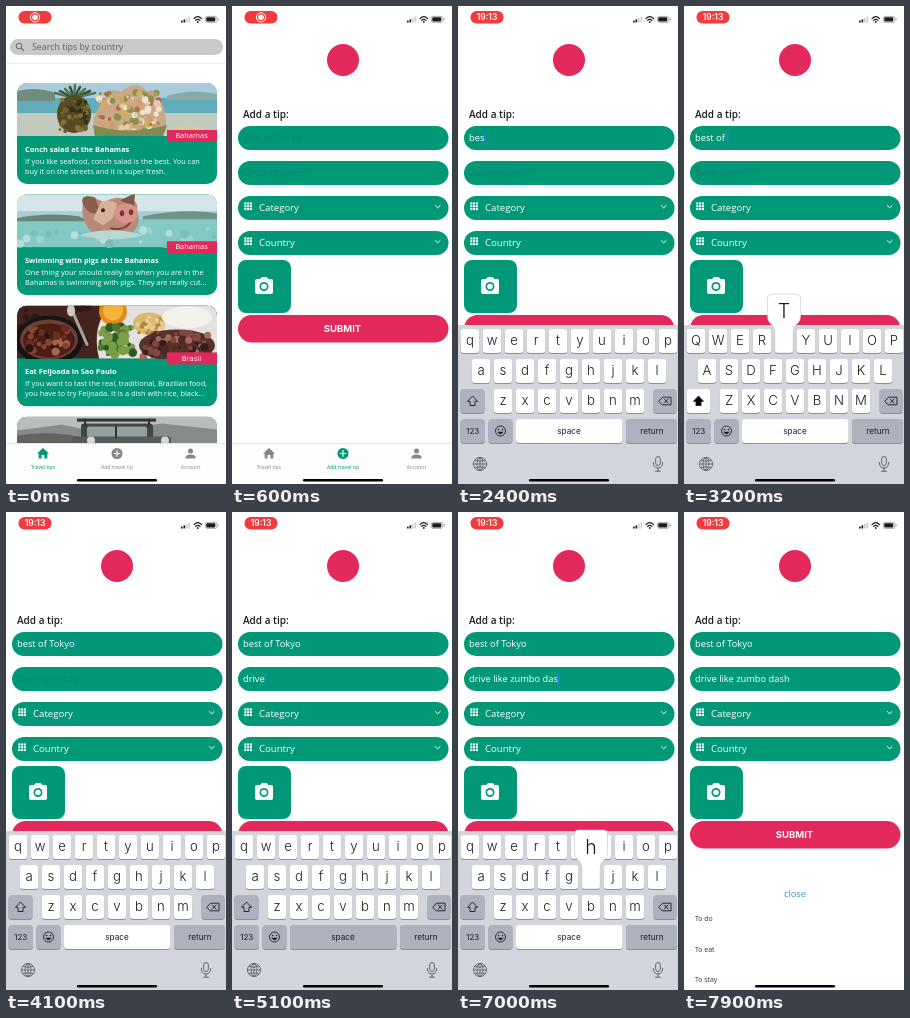
Animation of 220 by 478 pixels, one loop 8 s. Source, as an HTML page:

```html
<!DOCTYPE html>
<html lang="en">
<head>
<meta charset="utf-8">
<title>Travel tips</title>
<style>
  html, body { margin: 0; width: 100%; height: 100%; overflow: hidden; background: #fff; }
  svg { display: block; width: 100vw; height: 100vh; font-family: "Open Sans", "Noto Sans", sans-serif; }
  text { white-space: pre; }
  .ui { font-family: Inter, Roboto, sans-serif; }
</style>
</head>
<body>
<svg id="stage" viewBox="0 0 220 478" xmlns="http://www.w3.org/2000/svg"></svg>
<script>
const GREEN = '#009877', PINK = '#e3285c', GREY = '#85858a', INK = '#1c1c1e';
const LOOP = 8000, HOLD = 90;

const rect = (x, y, w, h, fill, r = 0, more = '') =>
  `<rect x="${x}" y="${y}" width="${w}" height="${h}" rx="${r}" fill="${fill}" ${more}/>`;
const disc = (x, y, r, fill, ry = r) => `<ellipse cx="${x}" cy="${y}" rx="${r}" ry="${ry}" fill="${fill}"/>`;
const shape = (d, fill) => `<path d="${d}" fill="${fill}"/>`;
const line = (d, stroke, width = 1) =>
  `<path d="${d}" fill="none" stroke="${stroke}" stroke-width="${width}" stroke-linecap="round" stroke-linejoin="round"/>`;
const text = (x, y, size, fill, str, more = '') =>
  `<text x="${x}" y="${y}" font-size="${size}" fill="${fill}" ${more}>${str}</text>`;
const mid = 'text-anchor="middle"';
const group = (id, body) => `<g id="${id}">${body}</g>`;

let seed = 7;
const random = () => (seed = (seed * 16807) % 2147483647) / 2147483647;
const scatter = (n, x, y, w, h, r, colors) => Array.from({ length: n }, () =>
  disc(x + random() * w, y + random() * h, r * (0.5 + random()), colors[Math.floor(random() * colors.length)])).join('');

// Card pictures, drawn in a 200 x 53 box
function saladPicture() {
  let leaves = '';
  for (let i = 0; i < 9; i++) {
    leaves += line(`M57 15L${38 + i * 5} ${2 + Math.abs(i - 4) * 2}`, i % 2 ? '#31513a' : '#587451', 2.5);
  }
  return rect(0, 0, 200, 53, '#a9cbdc') + rect(0, 15, 200, 18, '#62adbb') + rect(0, 30, 200, 23, '#c2c9bd') +
    shape('M0 8Q20 3 38 10V18H0Z', '#6f8c80') + shape('M150 13Q175 5 200 11V17H150Z', '#89aaa7') +
    leaves + disc(57, 31, 17, '#544a24', 19) + scatter(45, 43, 17, 28, 32, 2, ['#8a7030', '#342f1c', '#6a642c']) +
    shape('M77 50Q74 30 88 17Q93 3 104 9Q118 -4 130 8Q146 14 148 31Q151 44 145 53H78Z', '#c9a787') +
    scatter(100, 80, 9, 62, 40, 2.5, ['#e4c9a8', '#d59a71', '#b8654b', '#87924e', '#f0e3cf', '#cfae66']) +
    shape('M76 42Q110 53 150 42L146 53H78Z', '#7f8b52') + disc(172, 48, 17, '#d6c9a2', 5);
}
function pigPicture() {
  return rect(0, 0, 200, 27, '#d5e5e9') + rect(0, 17, 200, 10, '#a9cfd3') + rect(0, 25, 200, 28, '#83c8c3') +
    shape('M0 24Q28 18 62 22L72 27H0Z', '#67867a') + shape('M126 22Q165 14 200 19V25H126Z', '#6e9288') +
    scatter(25, 0, 33, 200, 20, 3, ['#9bd4cd', '#79beb9', '#b5ded6']) +
    shape('M66 9Q64 0 76 3L87 8Q100 0 110 6Q122 4 120 16Q126 32 111 42Q88 49 75 38Q63 27 66 9Z', '#b98977') +
    shape('M66 10Q62 -1 78 3L83 17Q73 24 66 10Z', '#8b5d4f') + shape('M103 6L118 -1L117 13Z', '#80574b') +
    shape('M84 8Q93 4 100 10L95 25L86 31L76 25Z', '#d9b29b') +
    disc(109, 19, 12, '#d9918a', 10) + disc(105, 19, 2.2, '#6c3c3b', 3) + disc(114, 18, 2.2, '#6c3c3b', 3) +
    disc(86, 16, 2, '#33231f') + line('M94 34Q105 37 113 29', '#7b4742', 2) +
    shape('M62 41Q94 31 127 41Q98 49 62 41Z', '#b8d9d1');
}
function stewPicture() {
  return rect(0, 0, 200, 53, '#43251e') + scatter(25, 0, 0, 75, 53, 4, ['#54332a', '#301a17']) +
    disc(32, 35, 34, '#171413', 25) + disc(32, 34, 29, '#6c4035', 20) + disc(32, 35, 26, '#4a1e17', 17) +
    scatter(38, 11, 22, 40, 25, 3, ['#662d20', '#30130f', '#85442f', '#a76649']) +
    line('M55 5L70 39', '#aaa09a', 3) + disc(54, 5, 4, '#d1c9c3', 6) +
    shape('M82 53Q74 18 94 0H200V53Z', '#e2e1df') +
    disc(96, 6, 14, '#e38a1e') + disc(96, 5, 10, '#f3b43e') +
    scatter(40, 84, 21, 33, 29, 3.5, ['#4b792d', '#2f5823', '#7a9d47']) +
    disc(132, 18, 16, '#d9b96e', 11) + scatter(30, 118, 11, 28, 18, 2, ['#e5ce8f', '#b8823d']) +
    disc(170, 12, 25, '#f4f1ea', 11) + disc(160, 40, 38, '#5a302b', 16) +
    scatter(55, 126, 27, 66, 25, 3, ['#351b1b', '#804a40', '#a66b58', '#4a2927']);
}
function truckPicture() {
  return rect(0, 0, 200, 53, '#b9bdbd') + shape('M0 14L45 8L80 16L145 7L200 13V53H0Z', '#858c8b') +
    shape('M0 19Q35 13 70 22V53H0Z', '#62645f') + rect(64, 7, 72, 30, '#414745', 3) +
    rect(70, 10, 60, 11, '#94a09f', 2) + rect(55, 20, 99, 20, '#555b58', 3) +
    rect(60, 2, 79, 3, '#303332') + line('M68 3V10M132 3V10M99 10V21', '#303332', 2) +
    disc(148, 24, 4, '#d5d8d3') + disc(74, 24, 4, '#d5d8d3');
}
const cards = [
  [saladPicture, 'Conch salad at the Bahamas', 'Bahamas',
    'If you like seafood, conch salad is the best. You can', 'buy it on the streets and it is super fresh.'],
  [pigPicture, 'Swimming with pigs at the Bahamas', 'Bahamas',
    'One thing your should really do when you are in the', 'Bahamas is swimming with pigs. They are really cut...'],
  [stewPicture, 'Eat Feijoada in Sao Paulo', 'Brasil',
    'If you want to tast the real, traditional, Brazilian food,', 'you have to try Feijoada. It is a dish with rice, black...'],
  [truckPicture, '', '', '', '']
];
const card = ([picture, title, place, first, second], i) =>
  `<g transform="translate(11 ${77 + i * 111.2})"><g clip-path="url(#card)">
    ${rect(0, 0, 200, 101, GREEN)}<g clip-path="url(#photo)">${picture()}</g></g>
    ${place && rect(150, 47, 50, 12, PINK)}${text(174.5, 55.3, 7.5, '#fff', place, mid)}
    ${text(8, 69, 7.4, '#fff', title, 'font-weight="700"')}
    ${text(8, 81, 7.4, '#fff', first)}${text(8, 90.6, 7.4, '#fff', second)}</g>`;

const listPage = () => cards.map(card).join('') +
  rect(0, 0, 220, 57, '#fff') + rect(0, 57, 220, 0.6, '#dedee1') +
  rect(4, 33, 213, 16, '#c9c9cd', 8) +
  `<circle cx="13" cy="40" r="2.8" fill="none" stroke="#66666a"/>` + line('M15.2 42.2L17.5 44.5', '#66666a', 1.2) +
  text(26, 44.2, 8.9, '#5f5f64', 'Search tips by country');

const field = y => rect(6, y, 210.5, 24, GREEN, 12);
function selectField(y, label) {
  let dots = '';
  for (let i = 0; i < 9; i++) dots += rect(12.3 + (i % 3) * 2.8, y + 6.4 + Math.floor(i / 3) * 2.8, 2.1, 2.1, '#fff');
  return field(y) + dots + text(27, y + 15.3, 9.6, '#fff', label) + line(`M203.3 ${y + 9.5}l2.4 2.3l2.4 -2.3`, '#fff');
}
const camera = shape('M23 275Q23 273 25 273H28L30 271H34.5L36.5 273H39.5Q41 273 41 275V286Q41 288 39.5 288H25Q23 288 23 286Z', '#fff') +
  disc(32, 280.5, 4.5, GREEN) + disc(32, 280.5, 2.8, '#fff');
const formPage = () => disc(111, 54, 16, PINK) +
  text(11, 112, 10, INK, 'Add a tip:', 'font-weight="600"') +
  field(120) + field(155) +
  text(11, 135.3, 9.3, '#07896c', 'Title of the tip', 'id="hint0"') +
  text(11, 170.3, 9.3, '#07896c', 'Description tip', 'id="hint1"') +
  text(11, 135.3, 9.3, '#fff', '', 'id="entry0"') + text(11, 170.3, 9.3, '#fff', '', 'id="entry1"') +
  rect(0, 0, 1.2, 11, '#3b7be8', 0.5, 'id="caret"') +
  selectField(190, 'Category') + selectField(225, 'Country') +
  rect(6, 254, 53, 53, GREEN, 8) + camera +
  rect(6, 309, 210.5, 27.5, PINK, 13.7) +
  text(110.5, 326.4, 9.5, '#fff', 'SUBMIT', mid + ' font-weight="700" class="ui"');

const tab = (x, id, icon, label) => `<g id="${id}">${icon}${text(x, 462.5, 5.2, 'currentColor', label, mid)}</g>`;
const tabBar = () => rect(0, 437, 220, 41, '#fdfdfd') + rect(0, 437, 220, 0.6, '#d8d8dc') +
  tab(37, 'tabList', shape('M37 442L31 447.5H32.7V452.5H35.6V449H38.4V452.5H41.3V447.5H43Z', 'currentColor'), 'Travel tips') +
  tab(111, 'tabAdd', disc(111, 447.5, 5.5, 'currentColor') + line('M108.2 447.5h5.6M111 444.7v5.6', '#fff', 1.2), 'Add travel tip') +
  tab(184.5, 'tabUser', disc(184.5, 445, 2.5, 'currentColor') +
    shape('M179.5 452.5V451Q180 448.5 184.5 448.5Q189 448.5 189.5 451V452.5Z', 'currentColor'), 'Account');

// Keyboard
const keys = {};
const SPECIAL = '#adb2bd';
const keyBox = (x, y, w, fill, id = '') => rect(x, y + 1, w, 24, '#8b8e96', 3.2) + rect(x, y, w, 24, fill, 3.2, id && `id="${id}"`);
function letterRow(letters, left, y) {
  return [...letters].map((c, i) => {
    const x = left + i * 22;
    keys[c] = { x, y };
    return keyBox(x - 9.2, y - 12, 18.4, '#fff') + text(x, y + 4.2, 13.2, INK, c, mid + ' class="ui letter" font-weight="300"');
  }).join('');
}
const word = (x, size, str) => text(x, 428, size, INK, str, mid + ' class="ui"');
const keyboard = () => rect(0, 319, 220, 159, '#d2d5dc') +
  letterRow('qwertyuiop', 12, 335) + letterRow('asdfghjkl', 23, 365) + letterRow('zxcvbnm', 45, 395) +
  keyBox(2.5, 383, 24, SPECIAL, 'shiftKey') +
  `<path id="shiftIcon" d="M14.5 390L9.5 395.3H12V399.5H17V395.3H19.5Z" fill="none" stroke="${INK}" stroke-width=".9" stroke-linejoin="round"/>` +
  keyBox(195.5, 383, 23, SPECIAL) +
  line('M201 395L204.5 391.2H213V398.8H204.5ZM206.3 393l3.8 4M210.1 393l-3.8 4', INK, 0.9) +
  keyBox(2.5, 413, 24.5, SPECIAL) + word(14.7, 8, '123') +
  keyBox(30.5, 413, 24, SPECIAL) + `<circle cx="42.5" cy="425" r="5" fill="none" stroke="${INK}" stroke-width=".9"/>` +
  disc(40.6, 423.6, 0.8, INK) + disc(44.4, 423.6, 0.8, INK) + shape('M39.3 425.8H45.7Q42.5 430.5 39.3 425.8Z', INK) +
  keyBox(58, 413, 106.5, '#fff', 'spaceKey') + word(111, 8.2, 'space') +
  keyBox(168, 413, 51, SPECIAL) + word(194, 8.2, 'return') +
  line('M15.5 464h13M22 457.5v13M17.3 460.4q4.7 2 9.4 0M17.3 467.6q4.7 -2 9.4 0', '#55585f', 0.8)
    .replace('/>', ' transform="translate(0 -6)"/>') +
  `<circle cx="22" cy="458" r="6.5" fill="none" stroke="#55585f" stroke-width=".9"/>` +
  `<ellipse cx="22" cy="458" rx="3" ry="6.5" fill="none" stroke="#55585f" stroke-width=".8"/>` +
  `<rect x="197.7" y="450.5" width="4.6" height="9" rx="2.3" fill="none" stroke="#55585f" stroke-width=".9"/>` +
  line('M195.3 456.5Q195.3 462 200 462Q204.7 462 204.7 456.5M200 462V465M197.5 465.2h5', '#55585f', 0.9) +
  group('popup', `<path d="M-12.5 -47H12.5Q16.5 -47 16.5 -43V-24Q16.5 -20 13 -17Q9.2 -14 9.2 -10V9Q9.2 12 6 12H-6Q-9.2 12 -9.2 9V-10Q-9.2 -14 -13 -17Q-16.5 -20 -16.5 -24V-43Q-16.5 -47 -12.5 -47Z" fill="#fff" stroke="#c3c6cd" stroke-width=".6"/>` +
    text(0, -23.5, 19.5, INK, '', mid + ' id="popupLetter" class="ui" font-weight="300"'));

const picker = () => rect(0, 342, 220, 136, '#fff') + text(111, 384.5, 9.4, '#3498d2', 'close', mid) +
  ['To do', 'To eat', 'To stay'].map((s, i) => text(11, 409 + i * 30.5, 6.9, '#333', s)).join('');

const statusBar = () => rect(12.5, 5, 33, 12.5, '#f13c3f', 6) +
  group('recIcon', `<circle cx="29" cy="11.3" r="4.6" fill="none" stroke="#fff"/>` + disc(29, 11.3, 2.8, '#fff')) +
  text(29, 14.3, 8.5, '#fff', '19:13', mid + ' id="clock" class="ui" font-weight="600"') +
  [0, 1, 2, 3].map(i => rect(175 + i * 2.5, 14.6 - i * 1.4, 1.7, 2 + i * 1.4, i < 2 ? INK : '#cfcfd2', 0.4)).join('') +
  line('M188 12.6Q191.8 8.8 195.6 12.6M189.6 14.4Q191.8 12.2 194 14.4', INK, 1.2) + disc(191.8, 16, 0.9, INK) +
  `<rect x="199.4" y="10.4" width="11.6" height="6" rx="1.8" fill="none" stroke="#8d8d90" stroke-width=".7"/>` +
  rect(200.3, 11.3, 9, 4.2, INK, 1) + rect(211.7, 12.3, 0.9, 2.2, '#8d8d90', 0.4);

document.getElementById('stage').innerHTML =
  `<defs><clipPath id="card">${rect(0, 0, 200, 101, '#000', 10)}</clipPath>
   <clipPath id="photo">${rect(0, 0, 200, 53.5, '#000')}</clipPath></defs>` +
  rect(0, 0, 220, 478, '#fff') + group('list', listPage()) + group('form', formPage()) +
  group('tabs', tabBar()) + group('keyboard', keyboard()) + group('picker', picker()) +
  group('status', statusBar()) + rect(71, 473, 80, 2.6, '#000', 1.3);

const el = id => document.getElementById(id);
const letters = [...document.querySelectorAll('.letter')];
const show = (node, on) => node.setAttribute('display', on ? 'inline' : 'none');
const drop = (id, dy) => { show(el(id), dy < 160); el(id).setAttribute('transform', `translate(0 ${dy})`); };
const ramp = (t, start, length) => Math.min(1, Math.max(0, (t - start) / length));
const easeOut = p => 1 - (1 - p) ** 3;

const entries = [
  { str: 'best of Tokyo', start: 2000, step: 144, y: 126 },
  { str: 'drive like zumbo dash', start: 4460, step: 125, y: 161 }
];

function draw(t) {
  const onForm = t >= 300;
  show(el('list'), !onForm);
  show(el('form'), onForm);
  el('tabList').setAttribute('color', onForm ? GREY : GREEN);
  el('tabAdd').setAttribute('color', onForm ? GREEN : GREY);
  el('tabUser').setAttribute('color', GREY);

  const fade = ramp(t, 950, 350);
  el('recIcon').setAttribute('opacity', 1 - fade);
  el('clock').setAttribute('opacity', fade);

  const up = easeOut(ramp(t, 1350, 525)), down = easeOut(ramp(t, 7250, 350));
  drop('keyboard', 160 * (1 - up + down));
  drop('picker', 160 * (1 - easeOut(ramp(t, 7500, 380))));

  let pressed = '';
  entries.forEach(({ str, start, step }, i) => {
    const typed = Math.max(0, Math.floor((t - start - HOLD) / step) + 1);
    el('entry' + i).textContent = str.slice(0, typed);
    show(el('hint' + i), typed === 0);
    const n = Math.floor((t - start) / step);
    if (n >= 0 && n < str.length && t - start - n * step < HOLD) pressed = str[n];
  });

  const active = t < 4250 ? 0 : 1;
  show(el('caret'), t >= 1900 && t < 7250);
  el('caret').setAttribute('x', 11 + (onForm ? el('entry' + active).getComputedTextLength() : 0));
  el('caret').setAttribute('y', entries[active].y);

  const upper = t >= 3080 && t < 3242;
  for (const node of letters) {
    const c = node.textContent.toLowerCase();
    node.textContent = upper ? c.toUpperCase() : c;
  }
  el('shiftKey').setAttribute('fill', upper ? '#fff' : SPECIAL);
  el('shiftIcon').setAttribute('fill', upper ? '#000' : 'none');
  el('spaceKey').setAttribute('fill', pressed === ' ' ? SPECIAL : '#fff');

  const key = keys[pressed.toLowerCase()];
  show(el('popup'), !!key);
  if (key) {
    el('popup').setAttribute('transform', `translate(${key.x} ${key.y})`);
    el('popupLetter').textContent = pressed;
  }
}

const begin = performance.now();
function tick() {
  draw((performance.now() - begin) % LOOP);
  requestAnimationFrame(tick);
}
tick();
</script>
</body>
</html>
```
